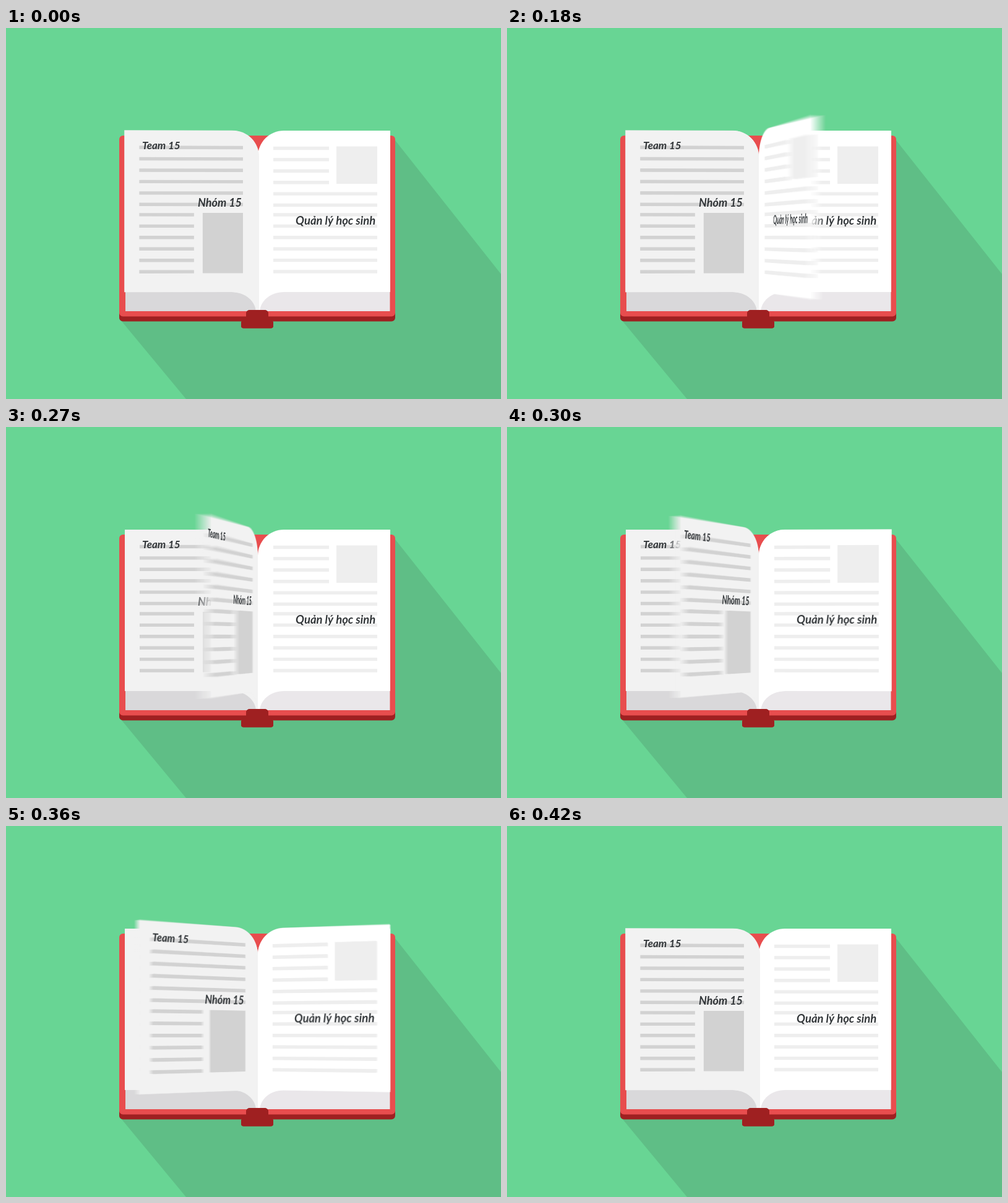
An HTML page with a canvas that plays this animation: 800x600 px, repeating every 450 ms.

```html
<!DOCTYPE html>
<html lang="vi">
<head>
<meta charset="utf-8">
<title>Book</title>
<style>
  html, body { margin: 0; width: 100%; height: 100%; overflow: hidden; background: #68d594; }
  canvas { display: block; }
</style>
</head>
<body>
<canvas id="stage" width="800" height="600"></canvas>
<script>
const W = 800, H = 600;
const HINGE = 407, EYE_Y = 338, DEPTH = 1500;
const LOOP = 450, REST = 150, STEP = 30, TURN_STEPS = 9;
const SAMPLES = 14;

// Page angle in degrees at each step of its turn; pages follow 10 steps apart.
const TURN = [1.5, 6, 16, 28, 41, 54, 67, 81, 96, 111, 124, 136, 147, 158, 167, 175.5, 178.4];
const SPACING = 10, FIRST = 5, SETTLED = 16;

const rowY = i => i < 6 ? 193.5 + 18.4 * i : 302 + 18.4 * (i - 6);

// Distances are measured outwards from the hinge.
const RIGHT = {
  width: 214, paper: '#fff', ink: '#eee', far: 193, near: 25,
  box: [127, 191.5, 193, 252],
  line: i => i < 4 ? [25, 115] : [25, 193],
  shift: i => i < 6 ? 1 : 0,
  texts: [['Quản lý học sinh', 468, 318, 18.5]]
};
const LEFT = {
  width: 215, paper: '#f2f2f2', ink: '#d2d2d2',
  box: [24, 299, 89, 396.5],
  line: i => i < 6 ? [24, 191] : [103, 191],
  shift: () => 0,
  texts: [['Team 15', 220, 196, 17], ['Nhóm 15', 310, 288.5, 18]]
};

function layer() {
  const c = document.createElement('canvas');
  c.width = W;
  c.height = H;
  return c.getContext('2d');
}

const stage = document.getElementById('stage').getContext('2d');
const base = layer(), work = layer();
const rad = deg => deg * Math.PI / 180;

function projector(deg) {
  const c = Math.cos(rad(deg)), s = Math.sin(rad(deg));
  return (u, y) => {
    const k = 1 / (1 - u * s / DEPTH);
    return [HINGE + u * c * k, EYE_Y + (y - EYE_Y) * k];
  };
}

function poly(g, color, points) {
  g.fillStyle = color;
  g.beginPath();
  points.forEach(p => g.lineTo(...p));
  g.fill();
}

function round(g, color, x, y, w, h, r) {
  g.fillStyle = color;
  g.beginPath();
  g.roundRect(x, y, w, h, r);
  g.fill();
}

function outline(width, inner) {
  const pts = [[width, 166], [42, 166]];
  const arc = (cx, cy, rx, ry, t) => [cx - rx * Math.sin(t), cy - ry * Math.cos(t)];
  for (let i = 1; i <= 16; i++) pts.push(arc(42 + inner, 208, 42, 42, rad(i * 90 / 16)));
  pts.push([inner, 458]);
  for (let i = 16; i >= 0; i--) pts.push(arc(42, 460, 39, 33, rad(i * 90 / 16)));
  pts.push([width, 427]);
  return pts;
}

function drawPage(g, deg, inner = 0) {
  const side = deg < 90 ? RIGHT : LEFT;
  const project = projector(deg);
  const shape = (color, pts) => poly(g, color, pts.map(p => project(...p)));
  const rect = (a, t, b, d) => shape(side.ink, [[a, t], [b, t], [b, d], [a, d]]);
  shape(side.paper, outline(side.width, inner));
  for (let i = 0; i < 12; i++) {
    const [a, b] = side.line(i), y = rowY(i) + side.shift(i);
    rect(a, y - 2.7, b, y + 2.7);
  }
  rect(...side.box);
}

function drawTexts(g, side) {
  g.fillStyle = '#323639';
  for (const [text, x, y, size] of side.texts) {
    g.font = `italic 700 ${size}px Lato, sans-serif`;
    g.fillText(text, x, y);
  }
}

// Text is projected one column at a time.
function turnTexts(g, deg) {
  const side = deg < 90 ? RIGHT : LEFT;
  const dir = deg < 90 ? 1 : -1;
  const c = Math.cos(rad(deg)), s = Math.sin(rad(deg));
  const distance = d => d / (c + d * s / DEPTH);
  for (let n = 0; n < 240; n++) {
    const u0 = distance(dir * n), u1 = distance(dir * (n + 1));
    if (u1 > side.width) break;
    const k = 1 / (1 - (u0 + u1) / 2 * s / DEPTH);
    const from = dir > 0 ? HINGE + u0 : HINGE - u1;
    const to = dir > 0 ? HINGE + n : HINGE - n - 1;
    g.drawImage(side.sheet, from, 0, u1 - u0, H, to, EYE_Y * (1 - k), 1, H * k);
  }
}

function drawClip(g) {
  round(g, '#9f2021', 388, 456, 36, 24, 6);
  round(g, '#9f2021', 380, 473, 52, 12.5, 4);
}

function drawBase(g) {
  g.fillStyle = '#68d594';
  g.fillRect(0, 0, W, H);
  poly(g, '#5fbe86', [[626, 178], [800, 398], [800, 600], [291, 600], [185, 472], [300, 300]]);
  round(g, '#9f2021', 183, 300, 446, 174.5, 6);
  round(g, '#e84d4e', 183, 174, 446, 292.5, 6);
  g.fillStyle = '#d9d8da';
  g.fillRect(193, 425, 215, 33);
  g.fillStyle = '#eae7ea';
  g.fillRect(408, 425, 212.5, 33);
  drawPage(g, 180);
  drawPage(g, 0);
  drawTexts(g, LEFT);
  drawTexts(g, RIGHT);
  drawClip(g);
}

function pagesAt(step) {
  if (step < 0) return [SETTLED];
  return [step + FIRST + SPACING, step + FIRST - SPACING, step + FIRST]
    .filter(i => i >= 0 && i < TURN.length);
}

function render(step) {
  const pages = pagesAt(step).map(i => {
    const before = TURN[i - 1] ?? 0, after = TURN[i + 1] ?? 180;
    return { angle: TURN[i], blur: step < 0 ? 0 : (after - before) / 4 };
  });
  // Average several moments of the turn for motion blur.
  for (let n = 0; n < SAMPLES; n++) {
    work.drawImage(base.canvas, 0, 0);
    for (const { angle, blur } of pages) {
      const offset = (n + 0.5) / SAMPLES - 0.5;
      drawPage(work, angle + blur * offset, step < 0 ? -2 : 0);
    }
    stage.globalAlpha = 1 / (n + 1);
    stage.drawImage(work.canvas, 0, 0);
  }
  stage.globalAlpha = 1;
  for (const { angle } of pages) turnTexts(stage, Math.min(180, angle + 1.5));
  drawClip(stage);
}

for (const side of [LEFT, RIGHT]) {
  const sheet = layer();
  drawTexts(sheet, side);
  side.sheet = sheet.canvas;
}
drawBase(base);

let shown = null;
function tick() {
  const t = performance.now() % LOOP;
  let step = Math.floor((t - REST) / STEP);
  if (step < 0 || step >= TURN_STEPS) step = -1;
  if (step !== shown) render(shown = step);
  requestAnimationFrame(tick);
}
tick();
</script>
</body>
</html>
```
